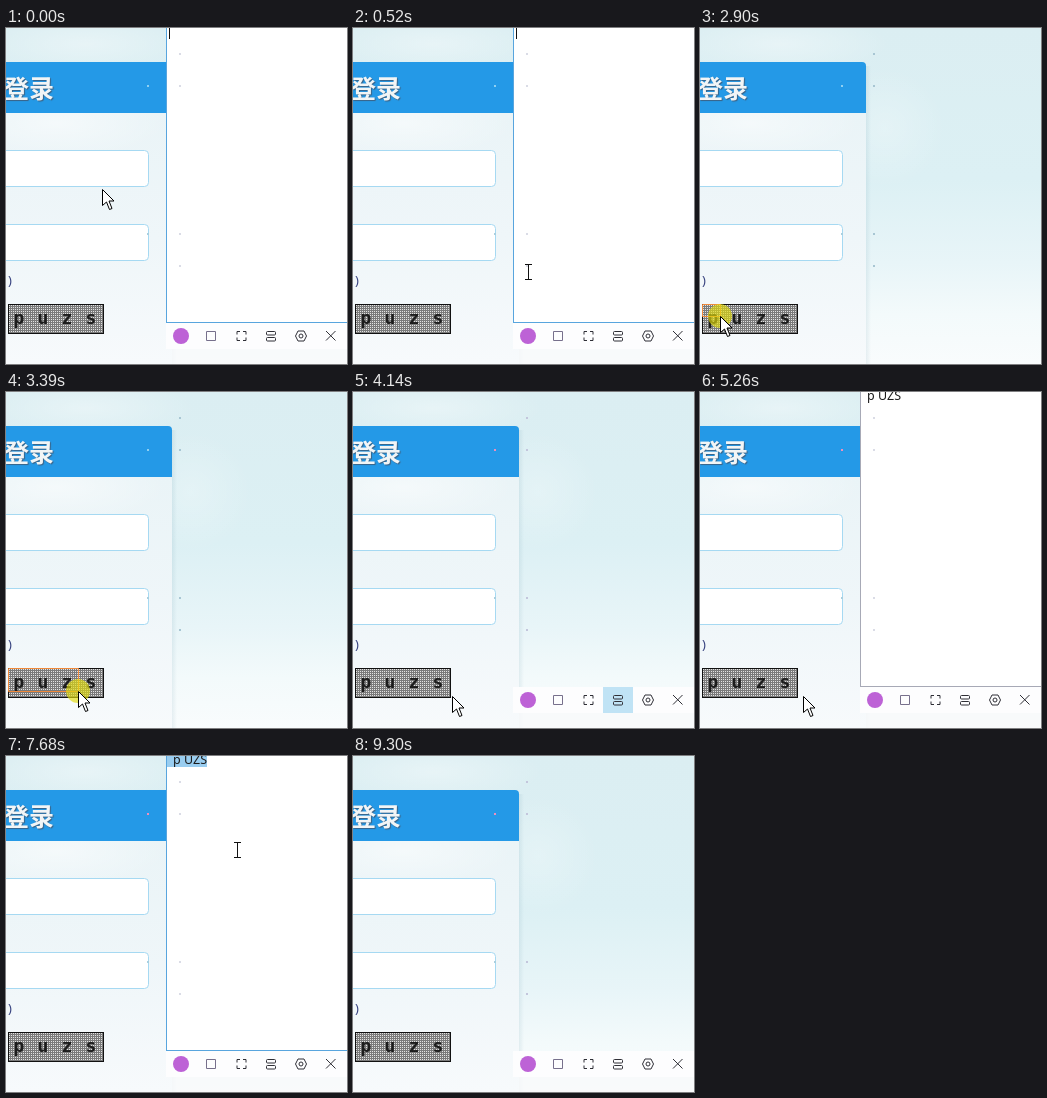
An HTML page with a canvas that plays this animation: 341 by 336 pixels, repeating every 9.38 s.

```html
<!DOCTYPE html>
<html lang="zh">
<head>
<meta charset="utf-8">
<style>
html, body { margin: 0; width: 100%; height: 100%; overflow: hidden; background: #e4f3f6; }
canvas { display: block; }
</style>
</head>
<body>
<canvas id="stage" width="341" height="336"></canvas>
<script>
const LOOP = 9380;
const c = document.getElementById('stage').getContext('2d');

// Pointer path: time, x, y
const PATH = [
  [0, 96, 161], [50, 96, 161], [220, 85, 180], [800, 258, 303], [980, 262, 306],
  [1040, 262, 306], [1510, 91, 281], [1930, 4, 277], [1980, 3, 277], [2260, 3, 277],
  [2350, 2, 277], [2740, 2, 276], [2900, 20, 288], [3640, 98, 304], [3770, 99, 304],
  [5230, 99, 304], [5260, 103, 304], [5400, 150, 323], [5800, 290, 328], [5930, 303, 318],
  [6489, 303, 318], [6490, 303, 330], [6920, 205, 5], [7090, 203, 5], [7330, 141, 6],
  [7680, 231, 94], [7920, 251, 125], [8170, 251, 125], [8500, 270, 310], [8710, 290, 340],
  [LOOP, 290, 340]
];

const during = (t, a, b) => t >= a && t < b;

function pointerAt(t) {
  const i = Math.max(1, PATH.findIndex(k => k[0] > t));
  const [a, b] = [PATH[i - 1], PATH[i]];
  const f = (t - a[0]) / (b[0] - a[0]);
  return [1, 2].map(n => Math.round(a[n] + (b[n] - a[n]) * f));
}

function rect(x, y, w, h, fill) {
  c.fillStyle = fill;
  c.fillRect(x, y, w, h);
}

function box(x, y, w, h, r, stroke, fill) {
  c.beginPath();
  c.roundRect(x, y, w, h, r);
  if (fill) { c.fillStyle = fill; c.fill(); }
  if (stroke) { c.strokeStyle = stroke; c.stroke(); }
}

function disc(x, y, r, fill) {
  c.beginPath();
  c.arc(x, y, r, 0, 7);
  c.fillStyle = fill;
  c.fill();
}

function lines(stroke, ...parts) {
  c.beginPath();
  for (const [x, y, ...rest] of parts) {
    c.moveTo(x, y);
    for (let i = 0; i < rest.length; i += 2) c.lineTo(rest[i], rest[i + 1]);
  }
  c.strokeStyle = stroke;
  c.stroke();
}

function text(s, x, y, font, fill, align = 'left') {
  c.font = font;
  c.textAlign = align;
  c.fillStyle = fill;
  c.fillText(s, x, y);
}

function gradient(x0, y0, x1, y1, ...stops) {
  const g = c.createLinearGradient(x0, y0, x1, y1);
  stops.forEach(([at, color]) => g.addColorStop(at, color));
  return g;
}

function cloud(x, y, rx, ry, alpha) {
  c.save();
  c.translate(x, y);
  c.scale(rx, ry);
  const g = c.createRadialGradient(0, 0, 0, 0, 0, 1);
  g.addColorStop(0, `rgba(255,255,255,${alpha})`);
  g.addColorStop(1, 'rgba(255,255,255,0)');
  rect(-1, -1, 2, 2, g);
  c.restore();
}

function drawCaptcha() {
  rect(2, 276, 96, 30, '#111');
  rect(3, 277, 94, 28, '#7a7a7a');
  for (let y = 277; y < 305; y += 2)
    for (let x = 3; x < 97; x += 2) rect(x, y, 1, 1, '#e2e2e2');
  [...'puzs'].forEach((ch, i) =>
    text(ch, 13 + i * 24, 296, 'bold 18px "DejaVu Sans Mono", monospace', '#1c1c1c', 'center'));
}

function drawPage() {
  rect(0, 0, 341, 336, gradient(0, 0, 0, 336,
    [0, '#dbeef2'], [.45, '#dcf0f4'], [.7, '#e8f5f8'], [.85, '#f3fafb'], [1, '#f9fcfd']));
  cloud(80, 16, 110, 30, .35);
  cloud(185, 100, 60, 60, .25);

  rect(166, 38, 5, 298, gradient(166, 0, 171, 0,
    [0, 'rgba(90,140,160,.12)'], [1, 'rgba(90,140,160,0)']));
  rect(0, 85, 166, 251, gradient(0, 85, 0, 336,
    [0, '#eaf4f7'], [.5, '#eff6f9'], [1, '#f7fafc']));
  cloud(50, 95, 110, 35, .5);
  box(-10, 34, 176, 51, [0, 4, 0, 0], null, '#2499e7');

  c.save();
  c.shadowColor = '#3a6285';
  c.shadowOffsetX = c.shadowOffsetY = 1;
  c.shadowBlur = 1;
  text('登录', 48, 70, 'bold 25px "Noto Sans CJK SC", "Noto Sans CJK", sans-serif', '#f2f5f6', 'right');
  c.restore();

  for (const y of [122.5, 196.5]) box(-10, y, 152.5, 36, 4, '#a6d9f2', '#fff');
  text(')', 2, 257, '13px "Noto Sans", sans-serif', '#37427f');
  drawCaptcha();
}

function drawPanel(t) {
  const focused = t < 980 || t >= 6920;
  const edge = focused ? '#58a5de' : '#a7a9b6';
  rect(160, 0, 181, 295, '#fff');
  rect(160, 0, 1, 295, edge);
  rect(160, 294, 181, 1, edge);
  if (t < 980) return rect(163, 0, 1, 11, '#111');
  if (t >= 7090) {
    const x = t < 7330 ? Math.min(201, Math.max(161, pointerAt(t)[0])) : 161;
    rect(x, 0, 201 - x, 11, '#99cdf0');
  }
  text('p UZS', 167, 8, '12.5px "Noto Sans", "Open Sans", sans-serif', '#1b1b1b');
}

function drawToolbar(hover) {
  const ink = '#2f2f36';
  rect(160, 295, 181, 26, '#fdfdfe');
  rect(166, 321, 175, 15, 'rgba(249,250,252,.8)');
  if (hover) rect(hover - 15, 295, 30, 26, '#c0e3f5');
  disc(175, 308, 8, '#bd62d6');
  box(200.5, 303.5, 9, 9, 0, '#77708c');
  for (const sx of [-1, 1])
    for (const sy of [-1, 1]) {
      const x = 235.5 + sx * 4.5, y = 308 + sy * 4.5;
      lines(ink, [x - sx * 3, y, x, y, x, y - sy * 3]);
    }
  for (const y of [303.5, 309.5]) box(260.5, y, 9, 3.5, 1, ink);
  lines(ink, [292, 303, 298, 303, 300.5, 308, 298, 313, 292, 313, 289.5, 308, 292, 303]);
  c.beginPath();
  c.arc(295, 308, 2, 0, 7);
  c.stroke();
  lines(ink, [320, 303, 329.5, 312.5], [329.5, 303, 320, 312.5]);
}

function drawDots(t, panel) {
  const late = t >= 4070;
  const side = panel ? '#dadce6' : late ? '#c3c6dc' : '#a8c6d3';
  for (const y of [25, 57, 205, 237]) rect(173, y, 2, 2, side);
  rect(141, 57, 2, 2, late ? '#ef8fbd' : '#8fd0f2');
  rect(141, 205, 2, 2, '#a9cfdf');
}

function drawArrow(x, y) {
  c.save();
  c.translate(x + .5, y + .5);
  c.beginPath();
  [[0, 0], [0, 16], [4, 12.5], [7, 20], [9.5, 19], [6.5, 11.5], [11.5, 11.5]]
    .forEach(p => c.lineTo(...p));
  c.closePath();
  c.fillStyle = '#fff';
  c.fill();
  c.strokeStyle = '#000';
  c.stroke();
  c.restore();
}

function drawBeam(x, y) {
  rect(x, y - 8, 1, 16, '#111');
  for (const dy of [-8, 7]) rect(x - 3, y + dy, 7, 1, '#111');
}

function draw(t) {
  const [x, y] = pointerAt(t);
  const panel = t < 980 || during(t, 4340, 9300);
  const toolbar = t < 1040 || t >= 4070;
  const visible = t < 6320 || during(t, 6490, 8710);
  const textDrag = during(t, 7090, 7330);
  const boxDrag = during(t, 2740, 3770);

  drawPage();
  if (panel) drawPanel(t);
  if (toolbar) {
    const over = visible && x >= 190 && y >= 295 && y < 318;
    drawToolbar(during(t, 4070, 4340) ? 265 : over ? 205 + 30 * Math.floor((x - 190) / 30) : 0);
  }
  drawDots(t, panel);

  if (boxDrag) box(2.5, 276.5, x - 2, y - 276, 0, '#f08a3c');
  if (boxDrag || textDrag) disc(x, y, 12, 'rgba(226,220,10,.65)');
  if (visible) {
    const beam = textDrag || panel && x > 160 && y < 295;
    (beam ? drawBeam : drawArrow)(x, y);
  }
}

function tick() {
  draw(performance.now() % LOOP);
  requestAnimationFrame(tick);
}
tick();
</script>
</body>
</html>
```
